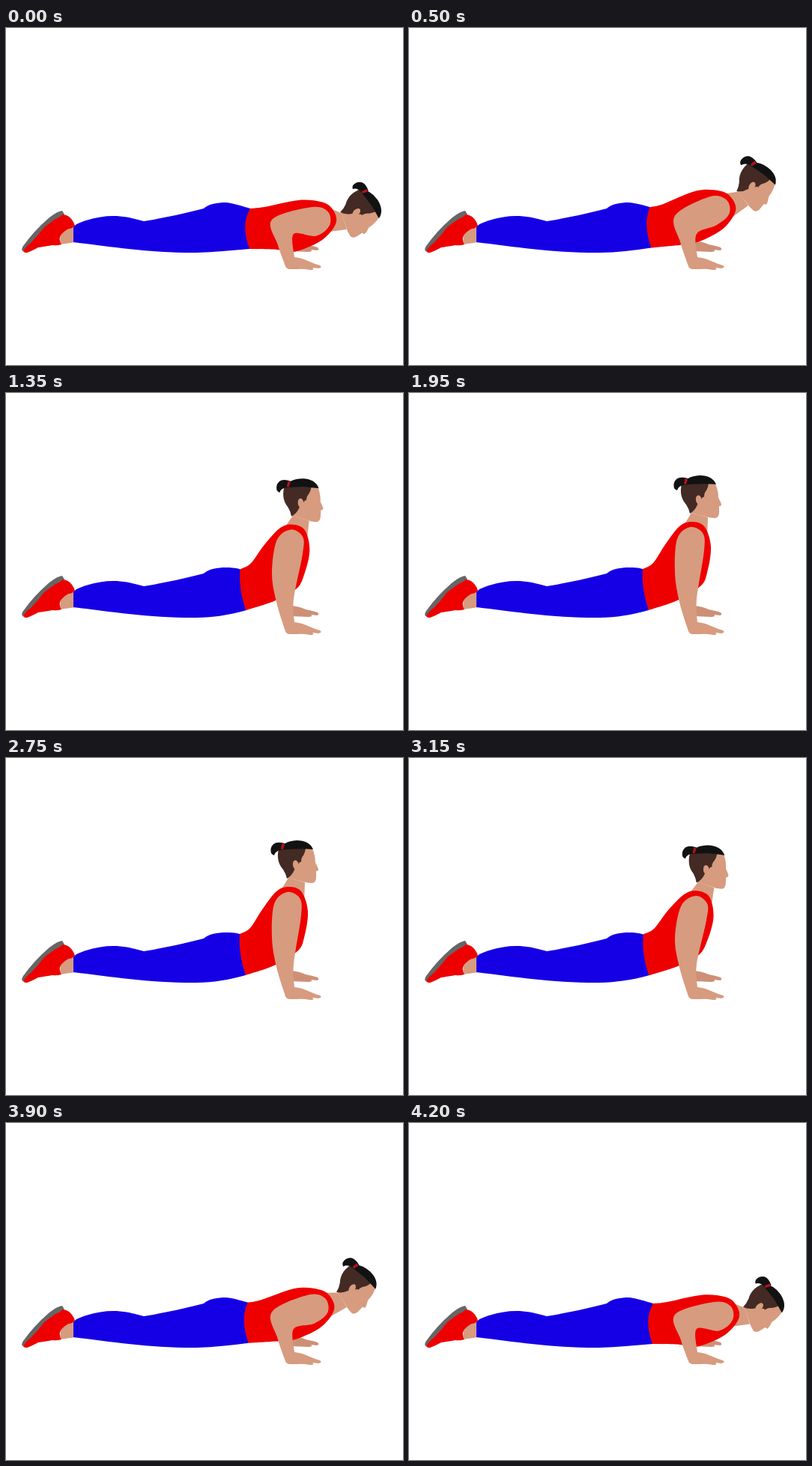
An HTML page for the animation above (4.25 s loop, 530 px wide and 450 px high).

```html
<!DOCTYPE html>
<html lang="en">
<head>
<meta charset="utf-8">
<title>Push-up to cobra</title>
<style>
  html, body { margin: 0; width: 100%; height: 100%; overflow: hidden; background: #fff; }
  svg { display: block; width: 530px; height: 450px; }
  .skin { fill: #d79b7f; }
  .shade { fill: #cd9076; }
  .red { fill: #ee0000; }
  .blue { fill: #1500e6; }
  .brown { fill: #432a24; }
  .black { fill: #121212; }
</style>
</head>
<body>
<svg viewBox="0 0 530 450">
  <path class="skin" d="M73 274L93 263V286L72 289Z"/>
  <path fill="#666" d="M22 298Q20 295 23 291Q38 270 58 253Q68 245 75 244L78 249L60 265L30 295Z"/>
  <path class="red" d="M23 298Q27 291 33 287Q43 277 51 266L66 255Q72 253 76 249Q84 250 88 256Q91 260 92 264Q88 268 84 268Q76 272 73 277Q70 283 74 289Q68 291 62 290Q50 292 43 293Q34 298 28 300Q24 300 23 298Z"/>
  <path class="shade" d="M380 284Q392 285 400 289Q410 291 416 293Q419 296 415 297L407 296Q411 298 404 299L380 298Z"/>
  <path class="blue" id="pants"/>
  <path class="skin" id="neck"/>
  <path class="red" id="torso"/>
  <path class="skin" id="arm"/>
  <g id="head">
    <path class="skin" d="M398 119L409 121C411 126 413 132 413 140Q417 147 417 149Q417 151 414 151L414 159Q414 166 409 167Q402 167 396 165L376 160L380 130Z"/>
    <path class="brown" d="M364 121C362 130 362 140 370 149Q374 155 375 161Q382 157 385 149L391 141Q392 138 394 139Q394 133 397 130Q399 127 400 121Z"/>
    <ellipse class="skin" cx="387" cy="143" rx="4" ry="6.5" transform="rotate(-12 387 143)"/>
    <path class="black" d="M364 123Q370 111 388 110Q405 110 410 122Q390 120 364 123Z"/>
    <path class="black" d="M372 114Q362 111 357 115Q352 120 354 127Q355 129 358 130Q359 126 363 124L368 122Z"/>
    <path fill="#b5121b" d="M368.500 114L372 115.500L370 122L367 121.500Z"/>
  </g>
</svg>
<script>
const LOOP = 4250, RISE = 1950, FALL = 2750, STEP = 50, TILT = 57;

const $ = id => document.getElementById(id);
const draw = (id, d) => $(id).setAttribute('d', d);

const ease = (s, a, b) => 1 - (1 - s ** a) ** b;

// How far the body is lowered: 0 is up, 1 is down
function lowered(t) {
  if (t < RISE) return 1 - ease(t / RISE, 1.8, 4.3);
  if (t < FALL) return 0;
  return ease((t - FALL) / (LOOP - FALL), 2.6, 2.1);
}

// Straight or bowed way between two values
const mix = (q, up, down, bow = 0) => up + (down - up) * q + bow * q * (1 - q);

// A rigid part: maps local points to the stage
function frame(x, y, degrees) {
  const a = degrees * Math.PI / 180, c = Math.cos(a), s = Math.sin(a);
  return (dx, dy) => [x + dx * c - dy * s, y + dx * s + dy * c];
}

// Open Catmull-Rom curve
function spline(points) {
  const at = i => points[Math.max(0, Math.min(points.length - 1, i))];
  let d = `M${at(0)}`;
  for (let i = 0; i < points.length - 1; i++) {
    const [p0, p1, p2, p3] = [at(i - 1), at(i), at(i + 1), at(i + 2)];
    const c1 = p1.map((v, k) => v + (p2[k] - p0[k]) / 6);
    const c2 = p2.map((v, k) => v - (p3[k] - p1[k]) / 6);
    d += `C${c1} ${c2} ${p2}`;
  }
  return d;
}

function render(t) {
  const q = lowered(t);
  const move = (x0, y0, x1, y1) => [mix(q, x0, x1), mix(q, y0, y1)];

  // Chest and head turn as rigid parts; the waist shifts a little
  const chest = frame(mix(q, 376, 414, 34), mix(q, 198, 256, 20), mix(q, 0, TILT, 65));
  const earX = mix(q, 386, 468, 74), earY = mix(q, 142, 245, -8), tilt = TILT * q;
  const head = frame(earX, earY, tilt);
  const top = move(312, 235, 326, 241), bottom = move(320, 290, 325, 295);
  const bulge = move(310, 261, 313, 262);

  draw('pants', `M90 266L94 262C107 256 125 251 143 251C160 251 172 255 184 258C210 254 240 247 264 241
    C270 235 283 233 293 233C300 233 ${top[0] - 7} ${top[1] - 2} ${top}L${bottom}
    C${bottom[0] - 25} 297 275 300 250 300C190 300 140 292 90 286Z`);

  draw('neck', `M${chest(-11, -18)}L${head(-9, 18)}L${head(13, 24)}L${chest(22, -4)}Z`);

  draw('torso', spline([
    top, move(326, 227, 345, 239),
    chest(-35, 6), chest(-16, -19), chest(0, -26), chest(18, -20), chest(27, 7), chest(22, 42), chest(13, 60),
    move(358, 277, 362, 296), bottom
  ]) + `Q${bulge} ${top}Z`);

  draw('arm', spline([
    [373, 318], move(361, 279, 363, 290), move(355, 240, 355, 256),
    chest(-18, -3), chest(-1, -19), chest(16, -11), chest(18, 12),
    [384, 275], [385, 306]
  ]) + `Q395 307 403 311Q412 315 419 317Q423 320 417 321L409 320
    Q413 323 406 323Q395 321 388 322L378 322Q374 321 373 318Z`);

  $('head').setAttribute('transform', `translate(${earX} ${earY}) rotate(${tilt}) translate(-386 -142)`);
}

const start = performance.now();
function tick() {
  const t = (performance.now() - start) % LOOP;
  render(t - t % STEP);
  requestAnimationFrame(tick);
}
tick();
</script>
</body>
</html>
```
